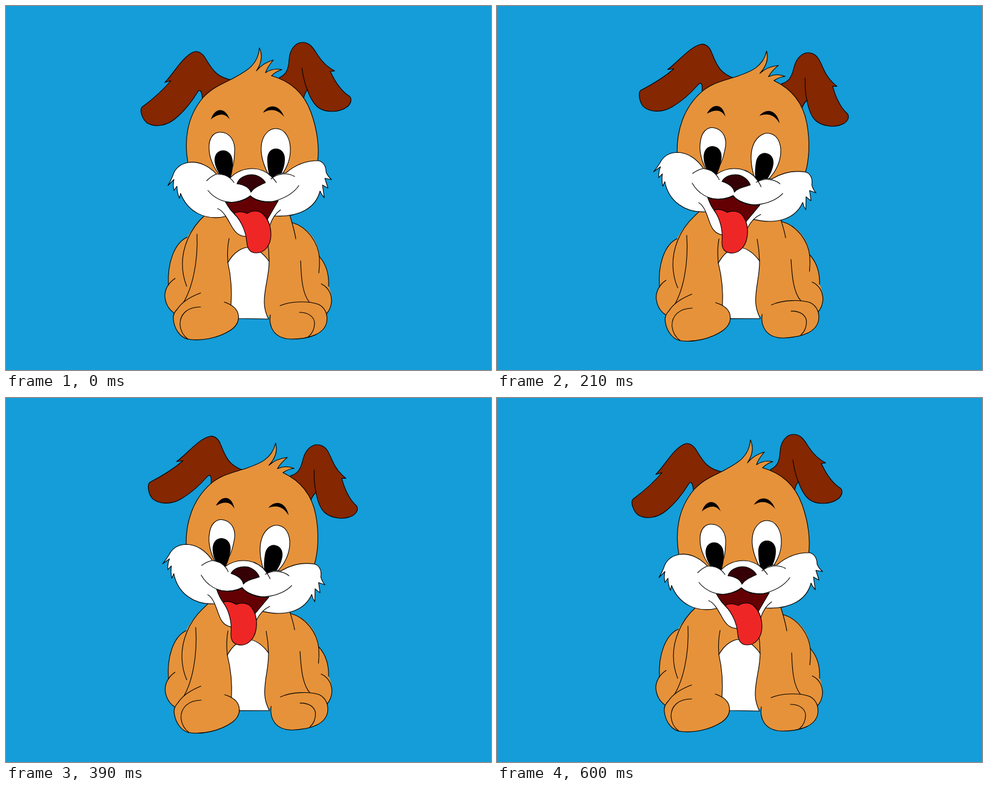
An HTML page with a canvas that plays this animation: 800 px wide and 600 px high, repeating every 0.63 s.

```html
<!DOCTYPE html>
<html lang="en">
<head>
<meta charset="utf-8">
<title>Puppy tilting its head</title>
<style>
html, body { margin: 0; width: 100%; height: 100%; overflow: hidden; background: #149dd8; }
canvas { display: block; }
</style>
</head>
<body>
<canvas id="stage" width="800" height="600"></canvas>
<script>
const ctx = document.getElementById('stage').getContext('2d');
const SKY = '#149dd8', FUR = '#e6923a', EAR = '#852700', WHITE = '#fff',
      TONGUE = '#ef2626', MOUTH = '#640003', NOSE = '#350106', INK = '#000';

const STEP = 30, STEPS = 21;
const HEAD_TILT = 12 * Math.PI / 180, BODY_TILT = -1.8 * Math.PI / 180;

const shape = (d, fill, outline = true) => ({ path: new Path2D(d), fill, outline });
const line = d => shape(d, null);

const body = [
  shape(`M350 320L330 343C316 356 306 368 299 381C277 391 266 425 268 460C263 467 262 474 262 478
    C263 492 270 501 277 506L290 512L520 512L528 508C535 500 537 492 537 487
    C537 475 535 467 532 462C533 445 530 428 517 413C515 385 497 364 472 357L460 320Z`, FUR, false),
  // haunches and shoulders
  line('M350 325L328 345C302 368 291 400 291 425C291 440 294 452 298 462'),
  line('M299 381C277 391 266 425 268 460'),
  line('M279 449C268 456 262 467 262 478C263 492 270 501 277 506'),
  line('M315 376C317 420 308 470 287 497'),
  line('M465 335C473 360 476 370 478 384'),
  line('M472 357C497 364 515 390 517 415C517.5 425 517 432 516 440'),
  line('M517 413C530 428 533 445 532 462'),
  line('M520 458C534 465 537 478 537 487C536 498 533 503 528 508'),
  line('M486 420C487 450 489 475 501 489'),
  // belly
  shape(`M366 423C376 405 390 398 399 398C413 398 424 407 434 421C434 446 426 464 426 488
    C426 500 429 508 433 516L384 515L371 494C373 470 371 445 366 423Z`, WHITE),
  line('M368 383C365 397 365 411 366 423'),
  line('M431 385C433 397 434 410 434 421'),
  // feet
  shape(`M321 473C305 479 291 487 283 499C277 505 275 511 276 517C278 532 286 545 299 549
    C320 553 350 548 371 534C381 527 385 518 383 508C381 499 372 492 360 488L321 473Z`, FUR, false),
  line(`M321 473C305 479 291 487 283 499C277 505 275 511 276 517C278 532 286 545 299 549
    C320 553 350 548 371 534C381 527 385 518 383 508C381 499 372 492 360 488`),
  line('M321 496C300 496 287 507 287 525C288 537 293 544 300 549'),
  shape(`M452 494C470 486 501 486 516 492C527 498 531 509 529 521C525 540 502 549 470 549
    C441 548 433 528 436 509Z`, FUR, false),
  line(`M452 494C470 486 501 486 516 492C527 498 531 509 529 521C525 540 502 549 470 549
    C441 548 433 528 436 509`),
  line('M484 505C500 505 508 513 509 522C509 532 505 540 499 545')
];

const head = [
  // ears
  shape(`M373 122C350 118 342 108 330 88C324 77 316 73 309 76C292 83 278 109 262 126L272 123
    C258 140 240 155 224 167C220 172 225 187 233 193C247 201 266 197 280 185
    C296 172 308 155 316 142C319 137 323 138 324 153L345 160Z`, EAR),
  shape(`M451 118C462 113 466 105 467 88C468 72 477 60 489 60C503 60 508 72 515 82
    C522 93 531 101 542 107L535 108C541 121 552 140 567 149C571 154 569 161 563 166
    C550 176 528 176 516 168C506 161 501 149 497 138C494 142 492 147 491 152L465 150Z`, EAR),
  line('M488 102C490 117 493 128 497 138'),
  // skull and tuft
  shape(`M300 258C294 225 297 184 325 151C340 134 360 127 375 119C395 108 416 98 418 69
    C424 82 421 95 413 107C420 98 430 92 441 89C435 96 431 101 428 110
    C437 104 447 103 455 105C447 107 442 111 438 115C470 124 492 145 503 175
    C514 205 517 235 514 257L500 300L310 300Z`, FUR),
  // brows
  shape('M338 187C344 168 361 165 369 187C361 176 350 177 338 187Z', INK, false),
  shape('M424 176C432 162 450 160 459 183C449 171 438 168 424 176Z', INK, false),
  // eyes
  shape(`M353 208C369 208 379 222 377 242C377 258 373 271 367 284L355 282
    C343 268 335 250 335 235C334 218 342 208 353 208Z`, WHITE),
  shape(`M358 238C367 238 374 245 374 258C374 268 373 276 370 284L356 283
    C348 272 344 262 344 254C344 244 350 238 358 238Z`, INK, false),
  shape(`M445 202C460 202 470 218 469 240C468 258 461 270 451 284L436 284
    C425 264 420 245 421 232C422 214 433 202 445 202Z`, WHITE),
  shape(`M445 235C455 235 460 243 460 252C460 264 456 273 451 283L436 284
    C432 274 431 262 431 252C431 243 436 235 445 235Z`, INK, false),
  // cheeks and snout
  shape(`M300 258C318 255 335 264 347 277Q361 277 370 283C381 272 395 268 407 268
    C422 268 432 275 440 282C446 277 453 275 462 275C477 262 495 255 514 255
    C521 255 528 262 528 274Q531 281 537 286Q531 285 526 284L531 300Q526 298 522 295L525 316
    Q520 311 518 305C511 332 485 349 441 346L366 346C328 356 299 338 288 309L286 317
    Q282 307 282 297L277 304Q275 294 277 286L267 296Q272 288 275 280C278 270 285 261 300 258Z`, WHITE),
  line('M331 288C336 283 342 279 347 277'),
  line('M362 279C368 282 373 286 376 291'),
  line('M432 276C438 281 443 286 446 291'),
  line('M437 285C448 276 464 274 476 281'),
  // mouth
  shape(`M362 323C380 326 395 319 403 313C412 321 430 325 449 321
    C442 333 436 345 433 355L400 360L377 343C371 338 367 332 362 323Z`, MOUTH),
  shape(`M362 323C367 332 372 339 377 343C388 353 395 368 397 380
    C382 380 376 370 371 361C365 350 358 337 349 334Z`, WHITE, false),
  line(`M362 323C367 332 372 339 377 343C388 353 395 368 397 380
    C382 380 376 370 371 361C365 350 358 337 349 334`),
  shape('M449 321C442 333 435 345 431 352L435 362C439 350 444 342 453 336Z', WHITE, false),
  line('M449 321C442 333 435 345 431 352L435 362C439 350 444 342 453 336'),
  shape(`M376 342C383 338 391 339 398 342C405 337 417 336 424 343C432 351 437 362 437 377
    C437 395 426 407 413 407C402 407 398 400 397 388C396 375 390 356 376 342Z`, TONGUE),
  line('M333 304C345 319 365 327 383 322C393 320 400 317 403 313'),
  line('M403 313C412 322 430 326 445 321C461 316 475 308 483 296'),
  shape(`M381 293C384 283 396 278 405 278C415 278 424 284 428 291
    C418 296 408 300 404 307C402 301 395 295 381 293Z`, NOSE)
];

function drawTilted(parts, x, y, angle) {
  ctx.save();
  ctx.translate(x, y);
  ctx.rotate(angle);
  ctx.translate(-x, -y);
  for (const { path, fill, outline } of parts) {
    if (fill) {
      ctx.fillStyle = fill;
      ctx.fill(path);
    }
    if (outline) ctx.stroke(path);
  }
  ctx.restore();
}

function draw(ms) {
  const step = Math.floor(ms / STEP) % STEPS;
  const swing = (1 - Math.cos(Math.PI * step / 10)) / 2;
  ctx.fillStyle = SKY;
  ctx.fillRect(0, 0, 800, 600);
  drawTilted(body, 400, 460, BODY_TILT * swing);
  drawTilted(head, 399, 232, HEAD_TILT * swing);
}

ctx.strokeStyle = INK;
ctx.lineWidth = 1.1;
ctx.lineCap = 'round';
ctx.lineJoin = 'round';

let start;
function tick(now) {
  start ??= now;
  draw(Math.max(0, now - start));
  requestAnimationFrame(tick);
}
draw(0);
requestAnimationFrame(tick);
</script>
</body>
</html>
```
